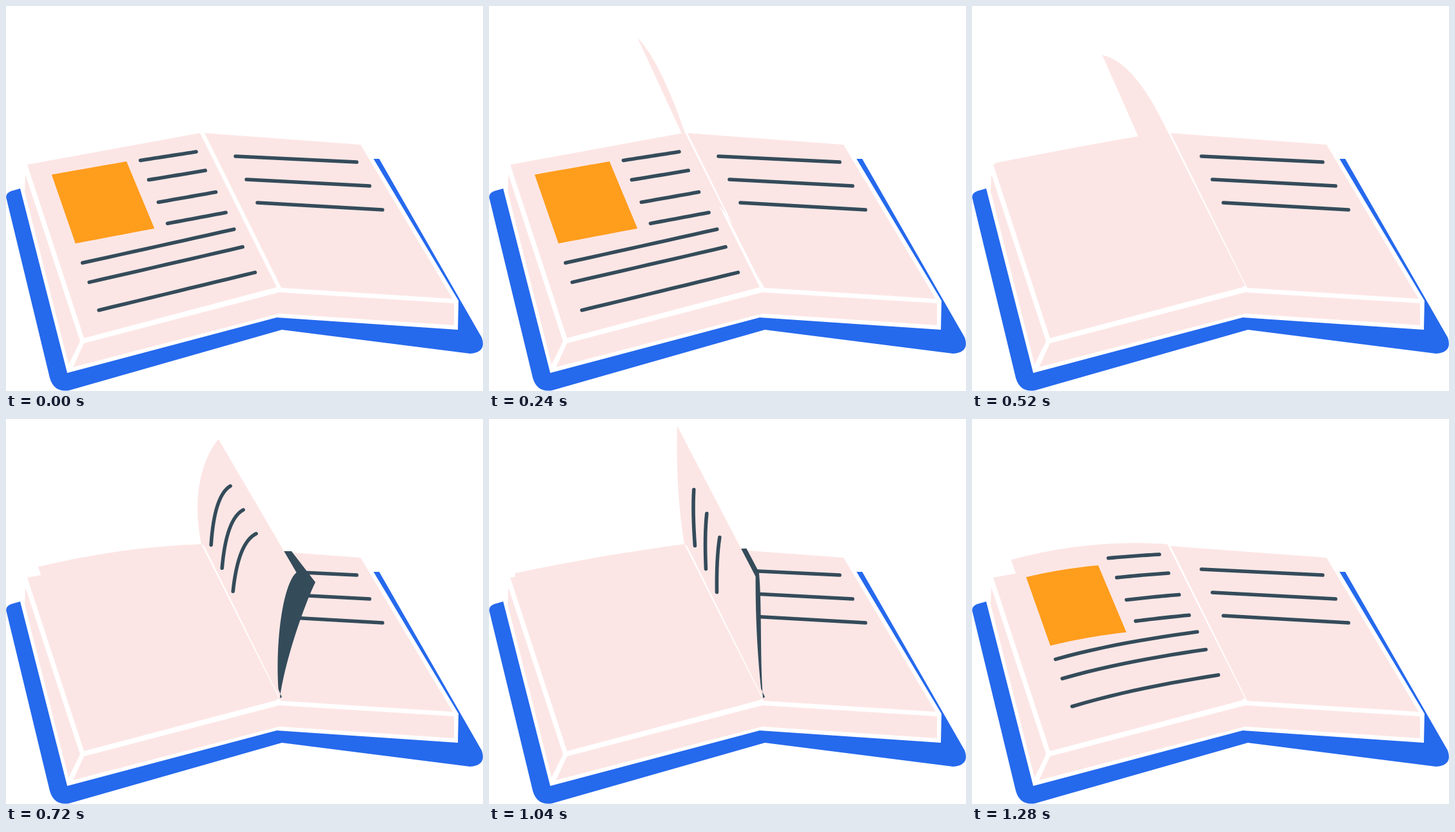
Recreate the animation shown at these times as an HTML page with a canvas. Size 740 by 597 pixels, loop 1320 ms.

```html
<!DOCTYPE html>
<html>
<head>
<meta charset="utf-8">
<title>Book</title>
<style>
html, body { margin: 0; overflow: hidden; background: #fff; }
canvas { display: block; }
</style>
</head>
<body>
<canvas width="740" height="597"></canvas>
<script>
const ctx = document.querySelector('canvas').getContext('2d');
const PINK = '#fce6e5', BLUE = '#2569ed', INK = '#344b5a', ORANGE = '#ff9d1c';
const LOOP = 1320, STEP = 40, RISE = 205, FALL = 350;
const STARTS = [0, 257, 543, 843];

// Corner positions of a turning page: flat right, curled, upright, flat left.
// The bow holds the handle offsets at full curl.
const TOP = { spine: [303, 194], tips: [[551, 215], [394, 66], [276, 2], [33, 246]], bow: [[-53, -48], [-36, -51]] };
const BOTTOM = { spine: [424, 434], tips: [[693, 455], [514, 227], [398, 247], [121, 515]], bow: [[-37, -35], [-28, -104]] };
const SHADE = { spine: [425, 433], tips: [[693, 455], [585, 280], [393, 231]], bow: [[-20, -20], [20, -95]] };
const FALL_BOW = [0, -40];

// Ends of the first text line on the right-hand page, flat to upright
const TEXT_START = [[356, 233], [316, 193], [320, 197]];
const TEXT_END = [[544, 242], [400, 94], [305, 112]];

// Heights of the left-hand text lines, as a share of the page
const NOTE_ROWS = [.1, .22, .358, .489, .596, .709, .872];

const mix = (a, b, k) => a.map((v, i) => v + (b[i] - v) * k);
const add = (a, b, k = 1) => a.map((v, i) => v + b[i] * k);
const curl = pose => 1 - Math.abs(1 - pose);

function along(points, pose) {
  const i = Math.min(Math.floor(pose), points.length - 2);
  return mix(points[i], points[i + 1], pose - i);
}

function poseAt(age) {
  if (age < RISE) return 2 * (age / RISE) ** 1.75;
  return 3 - (1 - (age - RISE) / FALL) ** 2;
}

// Cubic from the spine to the outer corner
function edge({ spine, tips, bow }, pose, tipPose = pose) {
  const tip = along(tips, tipPose);
  const handle = i => {
    const base = mix(spine, tip, (i + 1) / 3);
    return pose < 2 ? add(base, bow[i], curl(pose)) : add(base, FALL_BOW, Math.sin(Math.PI * (pose - 2)));
  };
  return [spine, handle(0), handle(1), tip];
}

function pointOn([a, b, c, d], u) {
  const ab = mix(a, b, u), bc = mix(b, c, u), cd = mix(c, d, u);
  return mix(mix(ab, bc, u), mix(bc, cd, u), u);
}

function fill(path, color) {
  ctx.fillStyle = color;
  ctx.fill(new Path2D(path));
}

function stroke(path) {
  ctx.strokeStyle = INK;
  ctx.lineWidth = 5.6;
  ctx.lineCap = ctx.lineJoin = 'round';
  ctx.stroke(new Path2D(path));
}

function drawText(pose) {
  for (let i = 0; i < 3; i++) {
    const start = add(along(TEXT_START, pose), [17, 36], i);
    const end = add(along(TEXT_END, pose), [20, 37], i);
    const bend = add(mix(start, end, .5), [-22, -68], curl(pose));
    stroke(`M${start}Q${bend},${end}`);
  }
}

// Picture and text printed on the page surface; u runs from spine to edge, v downwards
function drawNotes(pose) {
  const top = edge(TOP, pose), bottom = edge(BOTTOM, pose);
  const drift = Math.min(3 - pose, .15);
  const line = (u0, v0, u1, v1, slip) => Array.from({ length: 13 }, (_, i) => {
    const [u, v] = mix([u0, v0], [u1, v1], i / 12);
    const x = u * (1 + .6 * drift);
    return mix(pointOn(top, x), pointOn(bottom, x), v + drift * slip(u));
  }).join('L');
  const sink = () => .3, lift = u => -.5 * (1 - u) ** 3;
  fill(`M${line(.887, .08, .465, .09, sink)}L${line(.465, .5, .887, .482, sink)}Z`, ORANGE);
  NOTE_ROWS.forEach((v, i) => stroke('M' + line(i < 4 ? .39 : .885, v, .08, v + .015, lift)));
}

function drawBook() {
  fill('M22 283L8 287Q-2 291 1 300L68 577Q75 600 98 596L428 502L720 539Q746 537 738 514L579 237H570L300 330Z', BLUE);
  fill('M32 246L303 196L557 215L702 457L701 502L420 483L95 569L22 283L26 252Z', '#fff');
  fill('M33 246L301 197L420 436L121 515Z', PINK);
  fill('M308 197L550 215L693 454L427 437Z', PINK);
  fill('M121 523L424 444L695 461V495L424 477L104 560Z', PINK);
  fill('M30 261L115 520L97 556L29 288Z', PINK);
}

function drawShade(pose) {
  const [from, a, b, tip] = edge(SHADE, pose, pose < 1 ? pose ** 1.5 : pose);
  const x = Math.min(549, 654 - 136.5 * pose);
  fill(`M${from}C${a},${b},${tip}L${x} ${215 - (549 - x) * .095}L322 204L428 431Z`, INK);
}

function drawPage(pose, printed) {
  const [t0, t1, t2, t3] = edge(TOP, pose), [b0, b1, b2, b3] = edge(BOTTOM, pose);
  const rising = pose < 2;
  if (rising) drawShade(pose);
  fill(`M${t0}C${t1},${t2},${t3}L${b3}C${b2},${b1},${b0}${rising ? 'L427 437L308 198' : ''}Z`, PINK);
  if (rising) drawText(pose);
  else if (printed) drawNotes(pose);
}

function draw() {
  const time = Math.floor(performance.now() % LOOP / STEP) * STEP;
  ctx.clearRect(0, 0, 740, 597);
  drawBook();
  drawText(0);
  if (time < RISE + FALL) drawNotes(3);
  STARTS.forEach((start, i) => {
    const age = time - start;
    if (age > 0 && age < RISE + FALL) drawPage(poseAt(age), i === STARTS.length - 1);
  });
  requestAnimationFrame(draw);
}
draw();
</script>
</body>
</html>
```
